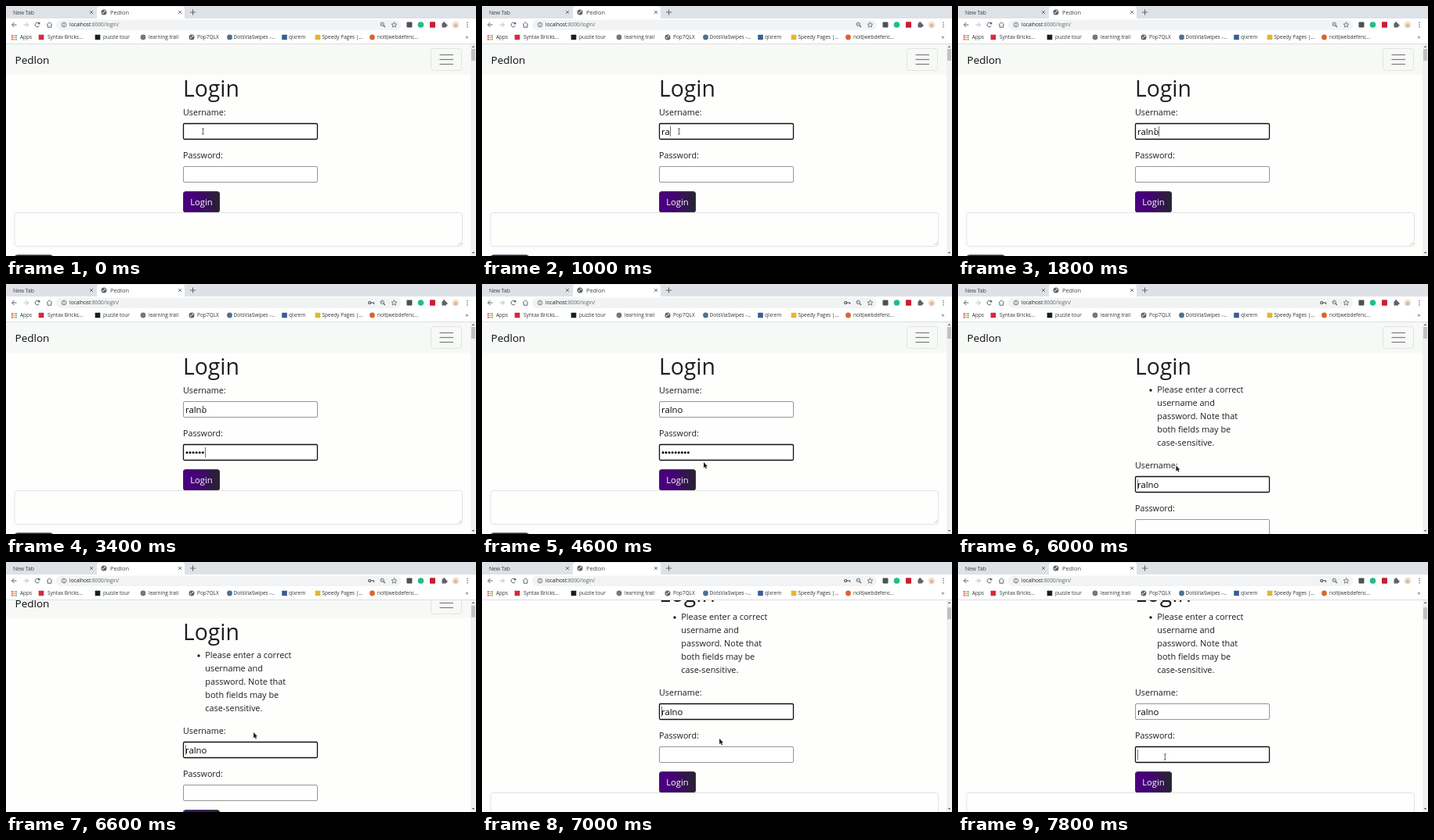
Write an HTML page with a canvas that moves like this. It is 600 px wide and 320 px high and loops after 8 s.

```html
<!DOCTYPE html>
<html lang="en">
<head>
<meta charset="utf-8">
<title>Login</title>
<style>
html, body { margin: 0; width: 100%; height: 100%; overflow: hidden; background: #fefefd; }
canvas { display: block; width: 600px; height: 320px; }
</style>
</head>
<body>
<canvas id="stage" width="600" height="320"></canvas>
<script>
const ctx = document.getElementById('stage').getContext('2d');
const STEP = 200, LOOP = 8000;
const FONT = '"Open Sans", "Noto Sans", sans-serif';
const USER = 'ralno', SITE = 'Pedlon';
const INK = '#1b1e21', ICON = '#5f6368', PAGE = '#fefefd';

function rect(x, y, w, h, fill) {
  ctx.fillStyle = fill;
  ctx.fillRect(x, y, w, h);
}
function box(x, y, w, h, r, fill, stroke, width = 1) {
  ctx.beginPath();
  ctx.roundRect(x, y, w, h, r);
  if (fill) { ctx.fillStyle = fill; ctx.fill(); }
  if (stroke) { ctx.strokeStyle = stroke; ctx.lineWidth = width; ctx.stroke(); }
}
function disc(x, y, r, fill) {
  ctx.beginPath();
  ctx.arc(x, y, r, 0, 7);
  ctx.fillStyle = fill;
  ctx.fill();
}
function ring(x, y, r, color, width = 0.9, from = 0, to = 2 * Math.PI) {
  ctx.beginPath();
  ctx.arc(x, y, r, from, to);
  ctx.strokeStyle = color;
  ctx.lineWidth = width;
  ctx.stroke();
}
// Open polyline through flat x,y pairs
function line(color, width, ...p) {
  ctx.beginPath();
  for (let i = 0; i < p.length; i += 2) ctx.lineTo(p[i], p[i + 1]);
  ctx.strokeStyle = color;
  ctx.lineWidth = width;
  ctx.stroke();
}
function text(s, x, y, size, color = INK) {
  ctx.font = `500 ${size}px ${FONT}`;
  ctx.fillStyle = color;
  ctx.fillText(s, x, y);
  return ctx.measureText(s).width;
}

function globe(x, y) {
  disc(x, y, 3.5, ICON);
  disc(x - 1.2, y + 0.7, 1, '#e4e5e6');
  disc(x + 1.1, y - 1.2, 1, '#e4e5e6');
}
function cross(x, y) {
  line(ICON, 0.9, x - 2, y - 2, x + 2, y + 2);
  line(ICON, 0.9, x + 2, y - 2, x - 2, y + 2);
}
function navArrow(x, y, dir, color) {
  line(color, 1, x - 3 * dir, y, x + 3 * dir, y);
  line(color, 1, x, y - 3, x - 3 * dir, y, x, y + 3);
}

function drawTabs(s) {
  rect(0, 0, 600, 16, '#dee1e6');
  box(116, 0.5, 112, 18, [4, 4, 0, 0], '#fff');
  text('New Tab', 9, 10.5, 6.8, '#3c4043');
  cross(109, 8);
  if (s.loading) {
    ring(125, 8, 2.8, '#9aa0a6', 0.9, s.k, s.k + 2);
    text('localhost:8000/login/', 133, 10.5, 6.7, '#3c4043');
  } else {
    globe(125, 8);
    text(SITE, 133, 10.5, 7.4, '#3c4043');
  }
  cross(222, 8);
  line(ICON, 1, 235, 8, 242, 8);
  line(ICON, 1, 238.5, 4.5, 238.5, 11.5);
}

function drawToolbar(s) {
  rect(0, 16, 600, 32, '#fff');
  navArrow(10.5, 24, 1, ICON);
  navArrow(25.5, 24, -1, '#b9bbbe');
  ring(40, 24, 2.8, ICON, 1, 0.5, 5.6);
  box(41, 21, 2.4, 2.4, 0, ICON);
  line(ICON, 1, 52, 24.2, 55.5, 20.8, 59, 24.2);
  line(ICON, 1, 53.2, 24, 53.2, 27.2, 57.8, 27.2, 57.8, 24);

  box(64, 17.5, 440, 13.5, 6.7, '#f1f3f4');
  ring(74, 24, 2.9, ICON, 0.8);
  line(ICON, 0.9, 74, 23.5, 74, 25.8);
  rect(73.5, 22, 1, 0.9, ICON);
  const w = text('localhost', 81, 26.3, 6.5, '#202124');
  text(':8000/login/', 81 + w, 26.3, 6.5, '#606468');

  if (s.key) {
    ring(464.2, 24, 1.5, '#4a4d51', 1.2);
    line('#4a4d51', 1.2, 465.7, 24, 469.6, 24, 469.6, 25.8);
  }
  ring(480.3, 23.3, 2.2, ICON, 0.9);
  line(ICON, 1.1, 482, 25, 484, 27);
  line(ICON, 0.7, 479.2, 23.3, 481.4, 23.3);
  const star = [];
  for (let i = 0; i <= 10; i++) {
    const r = i % 2 ? 1.6 : 3.6, a = i * Math.PI / 5;
    star.push(495.5 + r * Math.sin(a), 24.2 - r * Math.cos(a));
  }
  line(ICON, 0.8, ...star);

  box(511.5, 20.5, 7, 7, 1, '#4c5254');
  disc(529.5, 24, 3.8, '#1fbf85');
  box(541, 20.3, 7, 7.4, 1, '#c91f35');
  box(556.5, 22, 5.5, 5.5, 0.7, ICON);
  disc(559.2, 21.6, 1.4, ICON);
  disc(562.3, 24.8, 1.4, ICON);
  disc(574, 24, 4.6, '#eee6d6');
  disc(574, 25, 2.4, '#dfb7a0');
  for (let i = -1; i < 2; i++) disc(589, 24 + i * 2.7, 0.8, ICON);
}

function drawBookmarks() {
  const dots = ['#dc4b3f', '#e8a33a', '#4caf61', '#4d83d6'];
  for (let i = 0; i < 9; i++)
    rect(7 + (i % 3) * 2.5, 37 + Math.floor(i / 3) * 2.5, 1.7, 1.7, dots[(i + Math.floor(i / 3)) % 4]);
  text('Apps', 18, 42.4, 6.5, '#2f3336');
  const marks = [
    ['Syntax Bricks…', 45, 53, '#d5283d', 1],
    ['puzzle tour', 117, 124, '#15211b', 1],
    ['learning trail', 175, 182, '#777', 0],
    ['Pop7QLX', 237, 244, null, 0],
    ['DotsViaSwipes -…', 285.5, 290.5, '#4b7193', 0],
    ['qlxrem', 355.5, 361, '#3b5c94', 1],
    ['Speedy Pages |…', 398, 403.5, '#e2b82c', 1],
    ['nolt(webdefenc…', 467.5, 474, '#dd6330', 0]
  ];
  for (const [name, ix, tx, color, square] of marks) {
    if (!color) globe(ix, 40);
    else if (square) box(ix - 3.3, 36.7, 6.6, 6.6, 0.5, color);
    else disc(ix, 40, 3.4, color);
    text(name, tx, 42.4, 6.5, '#2f3336');
  }
  text('»', 586.5, 42.2, 7.5, '#3c4043');
  rect(0, 48, 600, 1, '#dcdedf');
}

function input(y, focused) {
  box(226.5, y + 0.5, 171, 20, 1.5, '#fff', focused ? '#101010' : '#8c8c8c', focused ? 1.3 : 0.9);
}
function caret(x, y) {
  rect(Math.round(x), y + 4, 1, 13, '#707070');
}
function buttonFill(x, w, hover) {
  const g = ctx.createLinearGradient(x, 0, x + w, 0);
  g.addColorStop(0, '#4b0082');
  g.addColorStop(0.4, '#450275');
  g.addColorStop(1, hover ? '#470079' : '#25252d');
  return g;
}
function button(y, hover) {
  if (hover) box(224.8, y - 1.1, 49.4, 29.4, 5, null, '#b9bdc1', 3);
  box(226, y + 0.3, 47, 27, 3.5, buttonFill(226, 47, hover));
  box(226.5, y + 0.8, 46, 26, 3.2, null, '#343a40', 0.8);
  text('Login', 235.3, y + 17.9, 11.2, '#fff');
}

function drawPage(s) {
  ctx.save();
  ctx.beginPath();
  ctx.rect(0, 49, 593, 271);
  ctx.clip();
  ctx.translate(0, -s.scroll);

  rect(0, 48, 593, 40, '#f7f9f7');
  text(SITE, 11.5, 73.8, 13.5, '#0c0d0e');
  box(542.5, 54.5, 39, 28, 3.5, null, '#e2e4e2');
  for (let i = 0; i < 3; i++) line('#7c7d7c', 1.2, 553.5, 62.5 + i * 6, 571, 62.5 + i * 6);

  text('Login', 226, 115.6, 28.3);
  if (s.error) {
    disc(246, 136, 1.7, INK);
    ['Please enter a correct', 'username and', 'password. Note that', 'both fields may be', 'case-sensitive.']
      .forEach((row, i) => text(row, 254.3, 139 + i * 17, 10.9));
    ctx.translate(0, 96);
  }
  text('Username:', 226, 139.5, 10.7);
  input(150, s.focus === 'user');
  const w = text(USER.slice(0, s.chars), 229, 164.6, 11.3, '#000');
  if (s.caret && s.focus === 'user') caret(s.error ? 229 : 229 + w, 150);

  text('Password:', 226, 194.5, 10.7);
  input(205, s.focus === 'pass');
  for (let i = 0; i < s.dots; i++) disc(231 + i * 4.05, 215.7, 1.5, '#000');
  if (s.caret && s.focus === 'pass') caret(229 + (s.dots ? s.dots * 4.05 + 0.6 : 0), 205);

  button(237, s.hover);
  box(11, 264.5, 571.5, 43, 3, PAGE, '#dee0e1', 0.9);
  line('#a5a5a5', 0.6, 577.5, 306, 581.5, 302);
  line('#a5a5a5', 0.6, 579.8, 306, 581.5, 304.3);
  box(11, 318.8, 49, 27, 3.5, buttonFill(11, 49, false), '#4a3a55', 0.8);
  ctx.restore();
}

function drawScrollbar(s) {
  rect(593, 49, 7, 271, '#f1f1f1');
  rect(594, 55 + s.scroll * 0.05, 5, 15, '#c1c1c1');
  for (const [y, d] of [[52, -1], [316, 1]]) {
    ctx.beginPath();
    ctx.moveTo(594.8, y - d);
    ctx.lineTo(598.2, y - d);
    ctx.lineTo(596.5, y + d);
    ctx.fillStyle = '#555';
    ctx.fill();
  }
}

function drawPointer(s) {
  const [x, y] = s.mouse;
  if (s.beam) {
    line('#fff', 1.8, x, y - 3.5, x, y + 3.5);
    line('#555', 0.9, x, y - 3.5, x, y + 3.5);
    for (const d of [-3.6, 3.6]) line('#555', 0.8, x - 1.6, y + d, x + 1.6, y + d);
    return;
  }
  const shape = [0, 0, 0, 7.4, 1.7, 5.9, 2.8, 8.5, 4, 8, 2.9, 5.5, 5, 5.3];
  ctx.beginPath();
  for (let i = 0; i < shape.length; i += 2) ctx.lineTo(x + shape[i], y + shape[i + 1]);
  ctx.closePath();
  ctx.strokeStyle = '#fff';
  ctx.lineWidth = 1.2;
  ctx.stroke();
  ctx.fillStyle = '#222';
  ctx.fill();
}

// Interpolates rows of [step, ...values]
function track(rows, k) {
  if (k <= rows[0][0]) return rows[0].slice(1);
  for (let i = 1; i < rows.length; i++) {
    const a = rows[i - 1], b = rows[i];
    if (k <= b[0]) {
      const u = (k - a[0]) / (b[0] - a[0]);
      return a.slice(1).map((v, j) => v + (b[j + 1] - v) * u);
    }
  }
  return rows[rows.length - 1].slice(1);
}

const DOT_STEPS = [11, 12, 13, 13, 14, 17, 18, 19, 20];
const MOUSE = [[23, 283, 228], [25, 259.5, 239.5], [29, 259.5, 239.5], [32, 316, 218], [34, 316, 218], [38, 264.3, 249.5]];
const SCROLL = [[32, 0], [33, 16], [34, 58], [35, 65]];

function stateAt(k) {
  const error = k >= 28;
  let focus = 'user';
  if (k >= 10 && k < 25 || k >= 38) focus = 'pass';
  else if (k >= 25 && k < 28) focus = 'button';
  return {
    k, error, focus,
    caret: error ? k >= 38 || k % 5 < 4 : k > 0 && k < 23,
    chars: Math.max(0, Math.min(5, k - 3)),
    dots: error ? 0 : DOT_STEPS.filter(d => k >= d).length,
    key: k >= 11,
    hover: k >= 25 && !error,
    loading: k === 26 || k === 27,
    scroll: track(SCROLL, k)[0],
    beam: k < 23 || k >= 37,
    mouse: k < 23 ? [251.5, 160.5] : track(MOUSE, k)
  };
}

function draw() {
  const s = stateAt(Math.floor((performance.now() % LOOP) / STEP));
  rect(0, 0, 600, 320, PAGE);
  drawPage(s);
  drawTabs(s);
  drawToolbar(s);
  drawBookmarks();
  drawScrollbar(s);
  if (s.loading) {
    box(-2, 309.8, 201, 12, [0, 3, 0, 0], '#dee1e6', '#c3c7cb', 0.7);
    text('Waiting for localhost…', 2, 317.6, 7.1, '#3c4043');
  }
  drawPointer(s);
  requestAnimationFrame(draw);
}
draw();
</script>
</body>
</html>
```
